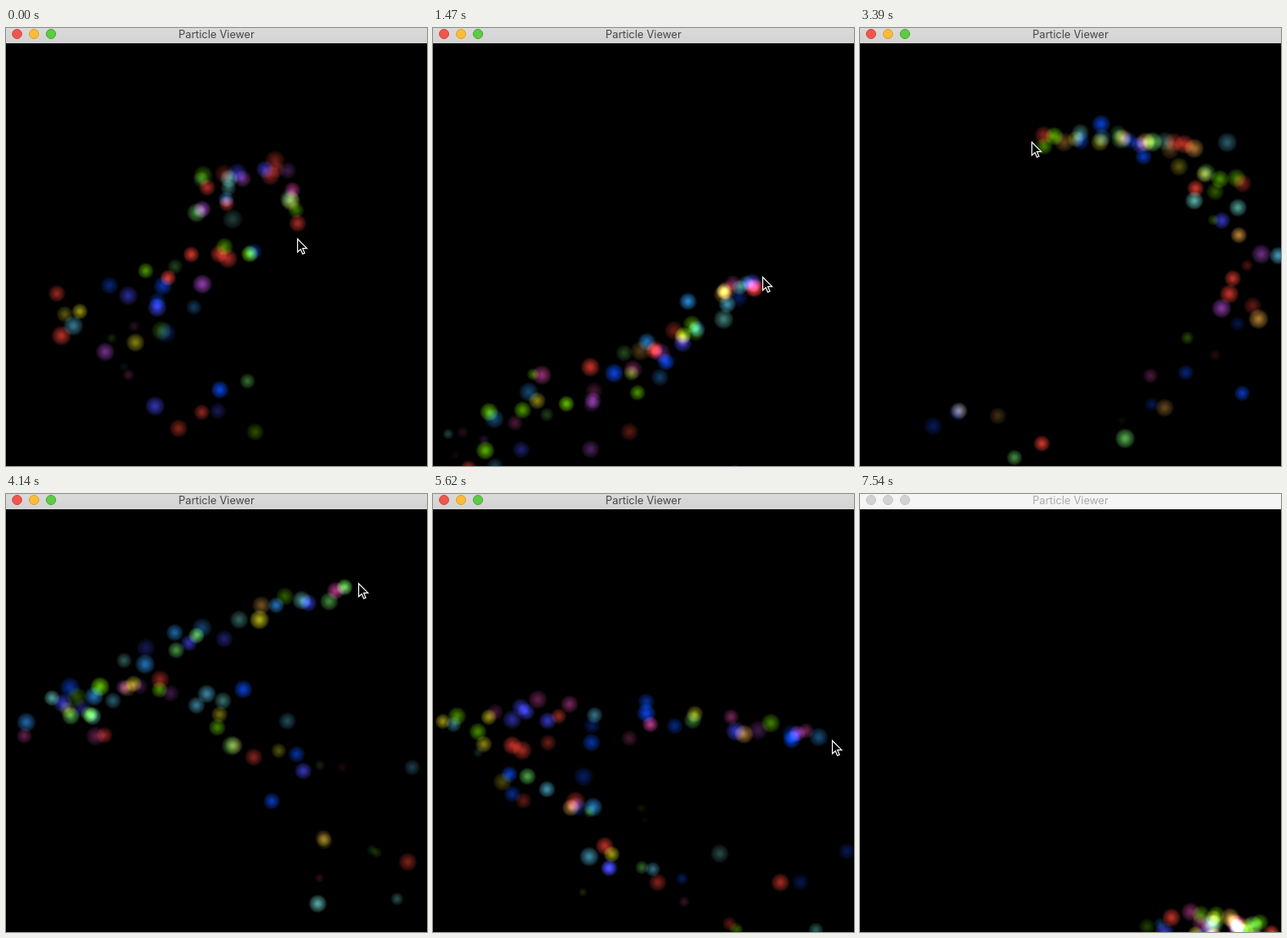
Animation of 496 by 516 pixels, one loop 7.64 s. Source, as an HTML page with a canvas:

```html
<!DOCTYPE html>
<html lang="en">
<head>
<meta charset="utf-8">
<title>Particle Viewer</title>
<style>
  html, body { margin: 0; width: 100%; height: 100%; overflow: hidden; background: #000; }
  canvas { position: absolute; left: 0; top: 0; display: block; }
  header {
    position: absolute; left: 0; top: 0; width: 496px; height: 18px;
    background: linear-gradient(#dadada, #d3d3d3);
    font: 12.6px/15px Inter, Roboto, sans-serif; color: #454545; text-align: center;
    white-space: nowrap;
  }
  header i {
    position: absolute; top: 1px; width: 10px; height: 10px; border-radius: 50%;
    background: var(--fill); border: 1px solid var(--rim);
  }
  header i:nth-of-type(1) { left: 7px; --fill: #f0564d; --rim: #d8463f; }
  header i:nth-of-type(2) { left: 27px; --fill: #fcbb38; --rim: #e0a028; }
  header i:nth-of-type(3) { left: 47px; --fill: #5ecb45; --rim: #47aa33; }
  header.idle { background: #f5f5f5; color: #a9a9a9; }
  header.idle i { --fill: #d2d2d2; --rim: #c4c4c4; }
</style>
</head>
<body>
<canvas id="stage" width="496" height="516"></canvas>
<header id="bar"><i></i><i></i><i></i>Particle Viewer</header>
<script>
const W = 496, H = 516, LOOP = 7640;
const LAST = 51, STEP = 7540 / LAST, LEAD = 18; // the picture advances in even steps, in ms
const ctx = document.getElementById('stage').getContext('2d');
const bar = document.getElementById('bar');

// Turning points of the pointer: step, x, y.
const turns = [
  [-7.4, 300, 240], [-5.4, 80, 240], [-3.4, 250, 225], [-2, 245, 160], [-1, 325, 172],
  [0, 343, 248], [1.5, 430, 290], [3.5, 50, 325], [6.5, 240, 350],
  [10, 388, 293], [11.5, 390, 275], [13.3, 215, 285],
  [15, 151, 244], [17, 430, 255], [19.2, 425, 125],
  [23, 202, 134], [24.3, 50, 210], [28, 415, 105], [29.5, 345, 190],
  [32, 180, 241], [34, 50, 220], [38, 470, 290], [39.4, 320, 330], [41, 470, 335],
  [42.6, 410, 300], [44, 429, 356], [46.5, 380, 460], [49.5, 440, 498], [LAST, 510, 535]
];

function pointer(s) {
  const end = turns.length - 1;
  let k = 0;
  while (k < end - 1 && turns[k + 1][0] <= s) k++;
  const at = i => turns[Math.min(end, Math.max(0, i))];
  const [a, b, c, d] = [at(k - 1), at(k), at(k + 1), at(k + 2)];
  const span = c[0] - b[0], u = (s - b[0]) / span;
  const slope = (p, q, j) => 0.7 * span * (q[j] - p[j]) / (q[0] - p[0]);
  return [1, 2].map(j => {
    const m = slope(a, c, j), n = slope(b, d, j), gap = c[j] - b[j];
    return b[j] + u * (m + u * (3 * gap - 2 * m - n + u * (m + n - 2 * gap)));
  });
}

let seed = 4711;
function rnd() {
  seed = (seed + 0x6D2B79F5) | 0;
  let r = Math.imul(seed ^ (seed >>> 15), 1 | seed);
  r = (r + Math.imul(r ^ (r >>> 7), 61 | r)) ^ r;
  return ((r ^ (r >>> 14)) >>> 0) / 4294967296;
}
const spread = size => size * (2 * rnd() - 1);

const palette = ['#0a48f0', '#0a48f0', '#3c40e0', '#2a90e8', '#4aa6c8', '#5ab4aa',
  '#70e000', '#70e000', '#60cc58', '#b8b418', '#d2943a', '#e63c30', '#e63c30',
  '#9a40b8', '#c03c90'];

const sprites = palette.map(color => {
  const c = document.createElement('canvas');
  c.width = c.height = 64;
  const g = c.getContext('2d');
  const fill = g.createRadialGradient(32, 32, 0, 32, 32, 32);
  ['f8', 'd0', '90', '58', '00'].forEach((alpha, i) => fill.addColorStop(i / 4, color + alpha));
  g.fillStyle = fill;
  g.fillRect(0, 0, 64, 64);
  return c;
});

const FALL = 185, RATE = 58; // px/s², particles per second
const particles = [];
for (let s = turns[0][0]; s < LAST; s += 1000 / RATE / STEP) {
  const [x, y] = pointer(s);
  particles.push({
    born: s, x: x + spread(8), y: y + spread(8), vx: spread(65), vy: spread(55),
    life: 0.7 + 1.5 * rnd(), size: 9.5 + 2.8 * rnd(), glow: 0.35 + 0.65 * rnd(),
    sprite: sprites[Math.floor(rnd() * sprites.length)]
  });
}

function drawParticle(p, s) {
  const age = (s - p.born) * STEP / 1000;
  if (age < 0.04 || age >= p.life) return;
  const x = p.x + p.vx * age, y = p.y + p.vy * age + FALL * age * age;
  const left = Math.min(1, 3 * (1 - age / p.life));
  const r = p.size * (0.4 + 0.6 * left);
  ctx.globalAlpha = p.glow * left;
  ctx.drawImage(p.sprite, x - r, y - r, 2 * r, 2 * r);
}

const arrow = new Path2D('M0 0V15.4L3.6 12.2L6 17.8L8.4 16.8L6 11.2H11Z');
function drawPointer([x, y]) {
  ctx.save();
  ctx.translate(x + 0.5, y + 0.5);
  ctx.fillStyle = '#000';
  ctx.fill(arrow);
  ctx.strokeStyle = '#fff';
  ctx.lineWidth = 1.2;
  ctx.stroke(arrow);
  ctx.restore();
}

function show(s) {
  ctx.globalCompositeOperation = 'source-over';
  ctx.globalAlpha = 1;
  ctx.fillStyle = '#000';
  ctx.fillRect(0, 0, W, H);
  ctx.globalCompositeOperation = 'lighter';
  for (const p of particles) drawParticle(p, s);
  ctx.globalCompositeOperation = 'source-over';
  ctx.globalAlpha = 1;
  drawPointer(pointer(s));
  bar.classList.toggle('idle', s === LAST);
}

let shown = -1;
const begin = performance.now();
function tick() {
  const ms = (performance.now() - begin) % LOOP;
  const s = Math.min(LAST, Math.floor((ms + LEAD) / STEP));
  if (s !== shown) show(shown = s);
  requestAnimationFrame(tick);
}
tick();
</script>
</body>
</html>
```
